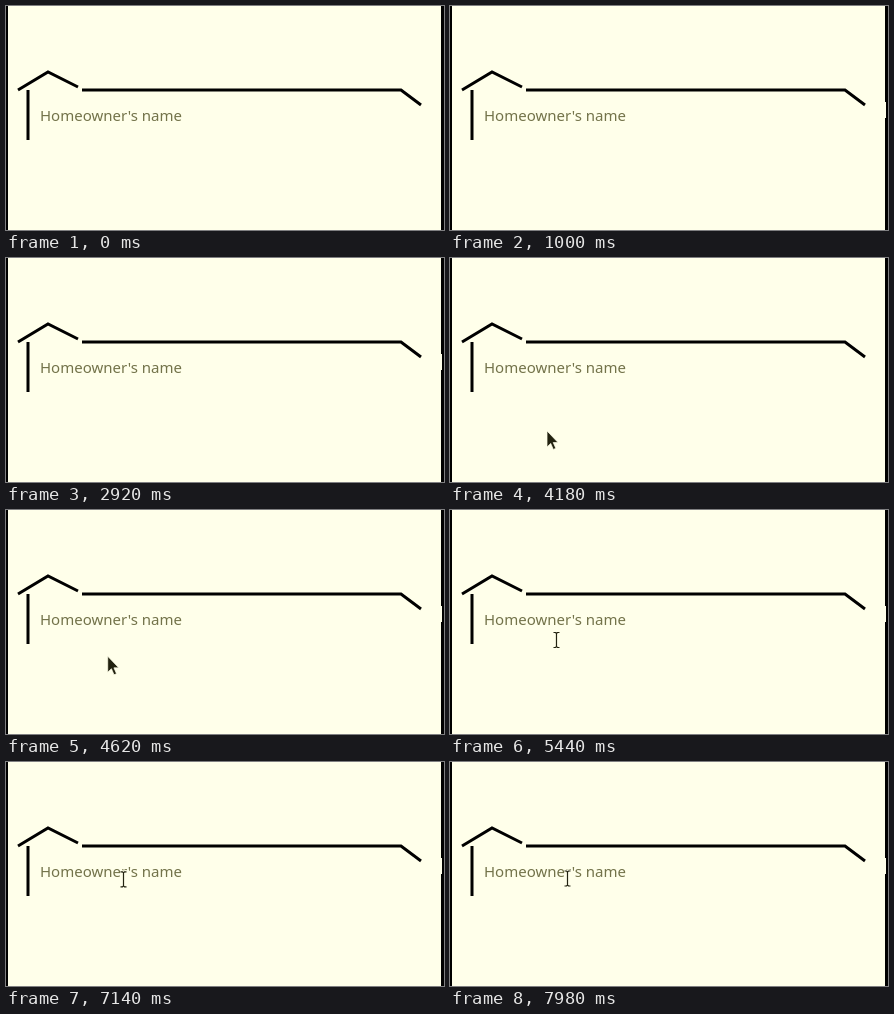
An HTML page that plays this animation: 438x224 px, repeating every 8000 ms.

```html
<!DOCTYPE html>
<html lang="en">
<head>
<meta charset="utf-8">
<title>Homeowner field</title>
<style>
  html, body { margin: 0; width: 100%; height: 100%; overflow: hidden; background: #ffffea; }
  svg { display: block; width: 438px; height: 224px; }
  text { font: 15px "Noto Sans", "Open Sans", sans-serif; fill: #73734a; }
  .house { fill: none; stroke: #000; stroke-width: 3; }
</style>
</head>
<body>
<svg viewBox="0 0 438 224">
  <rect width="438" height="224" fill="#ffffea"/>
  <path d="M0 0h2v224h-2zM435 0h3v224h-3z"/>
  <rect id="notch" x="435" y="96" width="1" height="16" fill="#ffffea"/>
  <path class="house" d="M12 84L42 66L72 81M22 84V134M76 84H395L415 99"/>
  <text x="34" y="115">Homeowner's name</text>
  <path id="arrow" d="M0 0V16L3.7 12.5L6.3 18.5L8.8 17.4L6.2 11.6H11Z"
        fill="#222210" stroke="#ffffea" stroke-width=".7"/>
  <g id="beam" fill="none">
    <path d="M-3 -7.5H-1L0 -6.5L1 -7.5H3M0 -6.5V6.5M-3 7.5H-1L0 6.5L1 7.5H3" stroke="#ffffea" stroke-width="3"/>
    <path d="M-3 -7.5H-1L0 -6.5L1 -7.5H3M0 -6.5V6.5M-3 7.5H-1L0 6.5L1 7.5H3" stroke="#222210" stroke-width="1.2"/>
  </g>
</svg>
<script>
  const LOOP = 8000, BLINK = 840, FIELD_BOTTOM = 142;
  const [notch, arrow, beam] = ["notch", "arrow", "beam"].map(id => document.getElementById(id));

  // Pointer positions: time, x, y
  const path = [
    [3600, 76, 224], [4080, 93, 187], [4180, 97, 173], [4500, 102, 152],
    [4920, 101, 132], [5440, 106.5, 130], [5760, 101, 129], [6100, 110, 121],
    [6420, 117.5, 115.5], [6700, 117.5, 118.5], [7440, 117.5, 116.5], [LOOP, 117.5, 116.5]
  ];

  function pointerAt(time) {
    const next = path.findIndex(point => point[0] > time);
    const [t0, x0, y0] = path[next - 1], [t1, x1, y1] = path[next];
    const k = (time - t0) / (t1 - t0);
    return [x0 + (x1 - x0) * k, y0 + (y1 - y0) * k];
  }

  function show(node, visible) {
    node.setAttribute("visibility", visible ? "visible" : "hidden");
  }

  function draw(now) {
    const time = now % LOOP;
    const visible = time >= path[0][0];
    const [x, y] = visible ? pointerAt(time) : [0, 0];
    const overField = y < FIELD_BOTTOM;
    show(arrow, visible && !overField);
    show(beam, visible && overField);
    for (const node of [arrow, beam]) node.setAttribute("transform", `translate(${x} ${y})`);
    show(notch, time >= 20 && (time + 20) % BLINK >= 40);
    requestAnimationFrame(draw);
  }
  requestAnimationFrame(draw);
</script>
</body>
</html>
```
